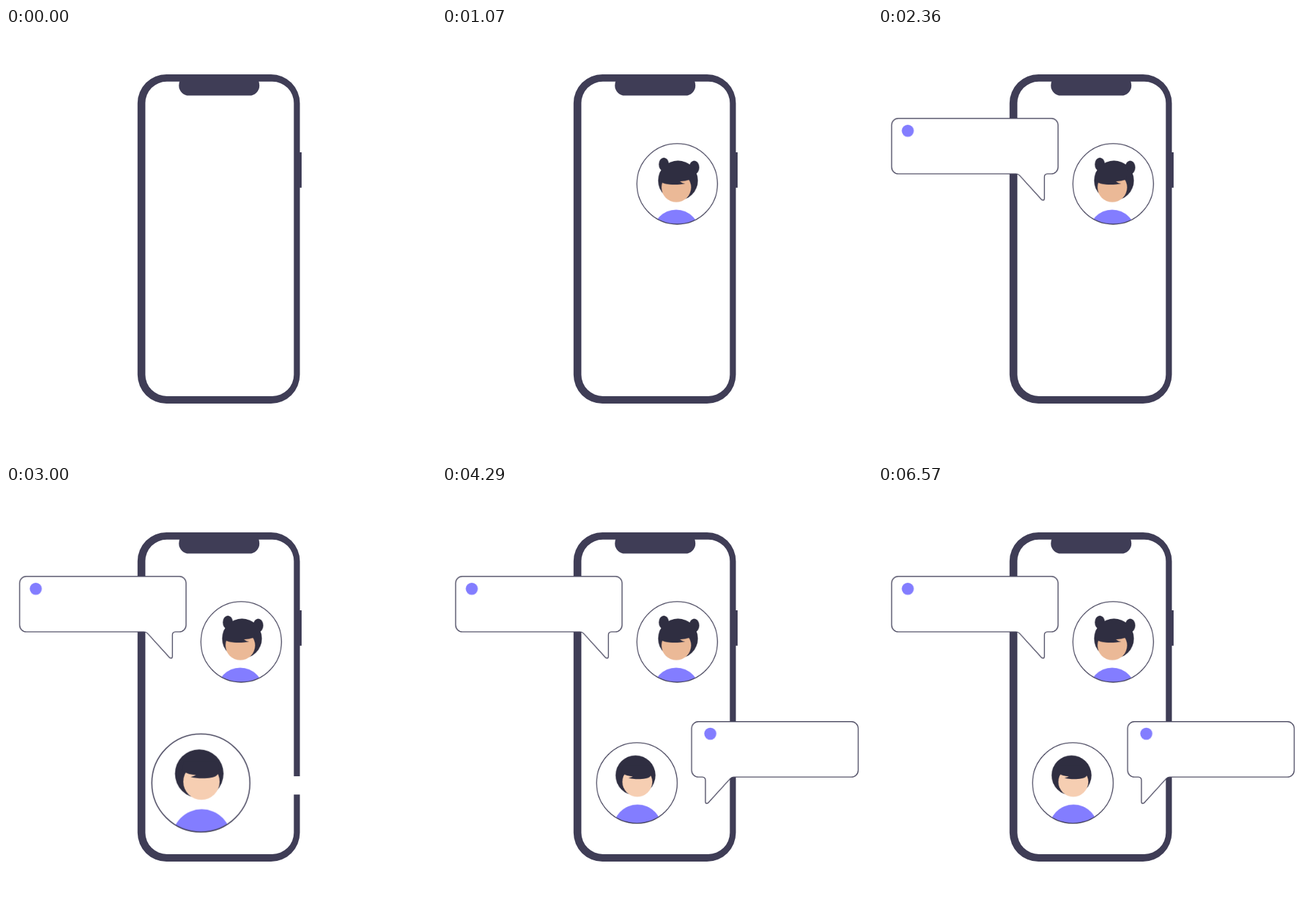
Recreate the animation shown at these times as an HTML page. Size 640 px wide and 640 px high, loop 6.64 s.

```html
<!DOCTYPE html>
<html lang="en">
<head>
<meta charset="utf-8">
<title>Phone chat</title>
<style>
  html, body { margin: 0; width: 100%; height: 100%; overflow: hidden; background: #fff; }
  svg { display: block; width: 100%; height: 100%; }

  .phone { fill: #3f3d56; }
  .hair { fill: #2f2e41; }
  .accent { fill: #837dff; }
  .paper { fill: #fff; }
  .ring { fill: none; stroke: #3f3d56; stroke-width: 1.25; }
  .bubble { fill: #fff; stroke: #3f3d56; stroke-width: 1.35; }

  .pop, .bubble { animation: 6640ms ease-in-out infinite both; }
  #her { transform-origin: 350px 232px; animation-name: her; }
  #him { transform-origin: 290px 442px; animation-name: him; }
  #say { transform-origin: 246px 256px; animation-name: say; }
  #reply { transform-origin: 393.6px 472.2px; animation-name: reply; }
  #say .accent { transform-origin: 44.3px 153px; animation-name: sayDot; }
  #reply .accent { transform-origin: 399.3px 368.7px; animation-name: replyDot; }
  #say .bubble { animation-name: sayLine; }
  #reply .bubble { animation-name: replyLine; }

  /* Avatars and bubbles overshoot, then settle */
  @keyframes her {
    0%, 1.5% { transform: scale(0); }
    10.92% { transform: scale(1.222); }
    15.8%, 100% { transform: scale(1); }
  }
  @keyframes him {
    0%, 35.84% { transform: scale(0); }
    45.33% { transform: scale(1.217); }
    50.15%, 100% { transform: scale(1); }
  }
  @keyframes say {
    0%, 14.77% { transform: scale(0); }
    22.06% { transform: scale(1.083); }
    28.24%, 100% { transform: scale(1); }
  }
  @keyframes reply {
    0%, 42.41% { transform: scale(0); }
    49.7% { transform: scale(1.083); }
    55.87%, 100% { transform: scale(1); }
  }
  @keyframes sayDot {
    0%, 17.92% { transform: scale(0); }
    26.96%, 100% { transform: scale(1); }
  }
  @keyframes replyDot {
    0%, 48.34% { transform: scale(0); }
    57.38%, 100% { transform: scale(1); }
  }
  /* Outlines come in after the white fill */
  @keyframes sayLine {
    0%, 17.62% { stroke-opacity: 0; }
    18.86%, 100% { stroke-opacity: 1; }
  }
  @keyframes replyLine {
    0%, 45.26% { stroke-opacity: 0; }
    46.5%, 100% { stroke-opacity: 1; }
  }
</style>
</head>
<body>
<svg viewBox="0 0 640 640">
  <defs>
    <path id="balloon" d="M30.2 134.5H258a10 10 0 0 1 10 10V207a10 10 0 0 1-10 10H252a4.5 4.5 0 0 0-4.5 4.5V254Q247.5 256.2 245.7 256.2Q244.2 256.2 243 255L210.6 219.3Q208.5 217 205.5 217H30.2a10 10 0 0 1-10-10V144.5a10 10 0 0 1 10-10Z"/>
    <clipPath id="herClip"><circle cx="350" cy="232" r="60"/></clipPath>
    <clipPath id="himClip"><circle cx="290" cy="442" r="60"/></clipPath>
  </defs>

  <g class="phone">
    <rect x="195.8" y="69" width="241.6" height="490" rx="43"/>
    <rect x="436" y="185" width="4" height="52.7"/>
    <rect class="paper" x="207.4" y="79.7" width="221" height="468.2" rx="32"/>
    <path d="M259 78Q257.3 81 257.3 85.5A15 15 0 0 0 272.3 100.6H362.2A15 15 0 0 0 377.2 85.5Q377.2 81 375.6 78Z"/>
  </g>

  <g id="her" class="pop">
    <circle class="paper" cx="350" cy="232" r="60"/>
    <g class="hair">
      <ellipse cx="330.2" cy="203" rx="7.6" ry="10"/>
      <ellipse cx="375.4" cy="207.6" rx="7.6" ry="10"/>
      <circle cx="351.2" cy="227" r="29.6"/>
    </g>
    <circle fill="#ebb997" cx="348.7" cy="237.2" r="22"/>
    <path class="hair" d="M325.5 228.5C332 234.5 352 234 362 231.6Q357 230.6 354 228.4Q362 228.2 369.5 225.5L371 212H326Z"/>
    <circle class="accent" cx="348.5" cy="305.7" r="35.2" clip-path="url(#herClip)"/>
    <circle class="ring" cx="350" cy="232" r="60"/>
  </g>

  <g id="say" class="pop">
    <use class="bubble" href="#balloon"/>
    <circle class="accent pop" cx="44.3" cy="153" r="9"/>
  </g>

  <g id="him" class="pop">
    <circle class="paper" cx="290" cy="442" r="60"/>
    <circle class="hair" cx="288" cy="430.6" r="29.7"/>
    <circle fill="#f6ceb2" cx="290.7" cy="440.3" r="22.2"/>
    <path class="hair" d="M267.5 427Q275 432 284 432.2Q281 434 277.5 434.6C288 437.5 305 436.5 309 433Q311.5 431 312.4 428L311 416H269Z"/>
    <circle class="accent" cx="291" cy="510.3" r="36.2" clip-path="url(#himClip)"/>
    <circle class="ring" cx="290" cy="442" r="60"/>
  </g>

  <g id="reply" class="pop">
    <use class="bubble" href="#balloon" transform="matrix(-1 0 0 1 639.6 216.2)"/>
    <circle class="accent pop" cx="399.3" cy="368.7" r="9"/>
  </g>
</svg>
</body>
</html>
```
